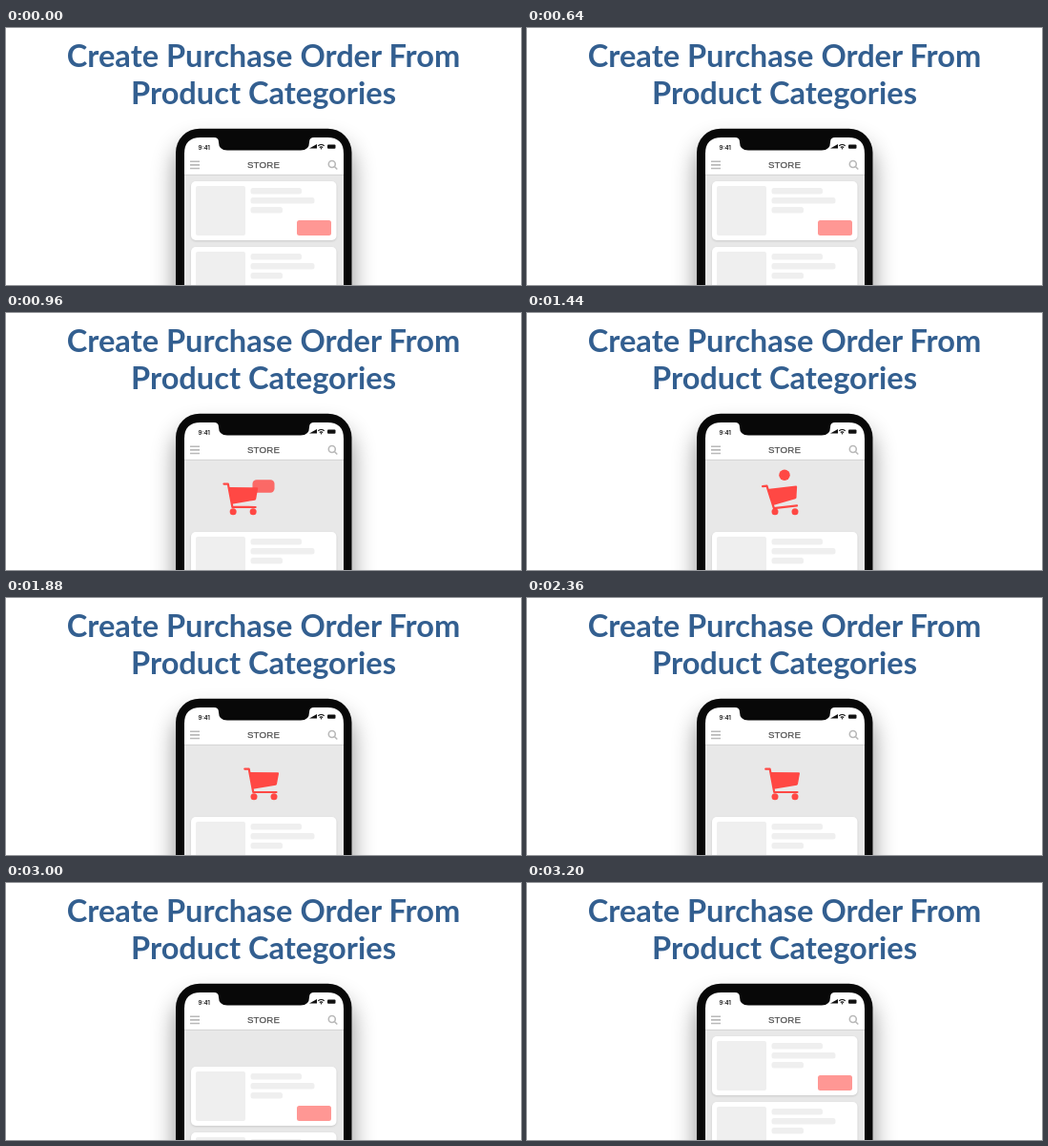
Write an HTML page that moves like this. It is 540 px wide and 270 px high and loops after 3.4 s.

```html
<!DOCTYPE html>
<html lang="en">
<head>
<meta charset="utf-8">
<style>
html, body { margin: 0; width: 100%; height: 100%; overflow: hidden; background: #fff; }
svg { display: block; width: 540px; height: 270px; }
.title { font: 700 32.6px Lato, sans-serif; fill: #335f90; text-anchor: middle; }
.store { font: 9.7px "Liberation Sans", Arial, sans-serif; letter-spacing: .2px; fill: #505050; stroke: #505050; stroke-width: .25; text-anchor: middle; }
.clock { font: 600 6.2px Inter, sans-serif; fill: #111; }
.phone { filter: drop-shadow(0 16px 12px rgba(0, 0, 0, .45)); }
.paper { filter: drop-shadow(0 1px 1px rgba(0, 0, 0, .13)); }
.icon { fill: none; stroke: #b9b9b9; stroke-width: 1.6; }
.red { fill: #ff4844; }
.bar { fill: none; stroke: #ff4844; stroke-width: 2.2; stroke-linecap: round; stroke-linejoin: round; }
</style>
</head>
<body>
<svg viewBox="0 0 540 270">
  <defs>
    <clipPath id="view"><rect x="187" y="155" width="167" height="115"/></clipPath>
    <rect id="paper" x="194" y="161" width="152.5" height="62" rx="5"/>
    <g id="parts" fill="#efefef">
      <rect x="199" y="166" width="52" height="52" rx="2"/>
      <rect x="256.5" y="168" width="53.5" height="6.5" rx="2.5"/>
      <rect x="256.5" y="178" width="67" height="6.5" rx="2.5"/>
      <rect x="256.5" y="188" width="33.5" height="6.5" rx="2.5"/>
    </g>
    <g id="card">
      <use href="#paper" class="paper" fill="#fff"/>
      <use href="#parts"/>
      <rect class="red" x="305" y="202" width="36" height="16" rx="2.5" opacity=".57"/>
    </g>
  </defs>

  <text class="title" x="270" y="41">Create Purchase Order From</text>
  <text class="title" x="270" y="80">Product Categories</text>

  <rect class="phone" x="178" y="105.7" width="184.5" height="260" rx="25" fill="#080808"/>
  <path d="M187 270V132q0-17 17-17h14q5 0 5 5q0 8.500 9 8.500h77q9 0 9-8.500q0-5 5-5h14q17 0 17 17v138z" fill="#fff"/>
  <text class="clock" x="201.5" y="128">9:41</text>
  <path d="M318 126.500h8l0-4.500z" fill="#111"/>
  <path d="M327.300 123.800q3.200-2.600 6.400 0M328.800 125.500q1.700-1.300 3.400 0" fill="none" stroke="#111" stroke-width="1.2"/>
  <circle cx="330.5" cy="126.700" r=".7" fill="#111"/>
  <rect x="337" y="122.500" width="8.500" height="4.200" rx="1" fill="#111"/>
  <path class="icon" d="M193 140.300h10M193 143.900h10M193 147.500h10"/>
  <text class="store" x="270" y="147.400">STORE</text>
  <circle class="icon" cx="341.800" cy="143" r="3.500"/>
  <path class="icon" d="M344.300 145.500l3 3"/>
  <path d="M187 154h167v116h-167z" fill="#e8e8e8"/>
  <path d="M187 154.300h167" stroke="#d4d4d4"/>

  <g clip-path="url(#view)">
    <g id="first">
      <g id="sheet"><use href="#paper" class="paper" fill="#fff"/></g>
      <g id="content"><use href="#parts"/></g>
      <use id="wash" href="#paper" class="red"/>
    </g>
    <circle id="ripple" class="red" cx="323" cy="210"/>
    <g id="cart">
      <g id="basket">
        <path class="bar" d="M250.300 179.600h4.400l4.500 24.200l24.300.200"/>
        <path class="red" d="M255.500 183l29.500.200q1.200.1 1 1.300l-2 11q-.2 1-1.200 1.200l-24 4z"/>
      </g>
      <circle class="red" cx="260" cy="208.800" r="3.500"/>
      <circle class="red" cx="281" cy="208.800" r="3.500"/>
    </g>
    <rect id="button" class="red"/>
    <g id="list">
      <use href="#card" y="69"/>
      <use href="#card" y="138"/>
    </g>
  </g>
</svg>
<script>
const LOOP = 3400, STEP = 40;
const $ = id => document.getElementById(id);
const set = (id, attrs) => {
  for (const name in attrs) $(id).setAttribute(name, attrs[name]);
};
const mix = (a, b, p) => a + (b - a) * p;

// Progress from 0 to 1 over a span of time, straight or eased
const span = (t, start, length) => Math.min(1, Math.max(0, (t - start) / length));
const ease = (t, start, length) => (1 - Math.cos(Math.PI * span(t, start, length))) / 2;

// Swing that dies away after one and a half turns
function wobble(t, start, length, size) {
  const p = span(t, start, length);
  return size * Math.sin(3 * Math.PI * p) * (1 - p);
}

const scaleAt = (s, x, y) => `translate(${x} ${y}) scale(${s}) translate(${-x} ${-y})`;

function tapCard(t) {
  const press = span(t, 640, 160), fade = span(t, 800, 120);
  const shrunk = scaleAt(1 - .05 * press, 270, 163);
  set('first', { opacity: 1 - fade });
  set('sheet', { transform: shrunk });
  set('wash', { transform: shrunk, opacity: .07 * press });
  set('content', { transform: scaleAt(1 - .09 * press, 264, 178) });
  set('ripple', { r: 25 * ease(t, 640, 160) + 4 * fade, opacity: .13 * (1 - fade) });
}

// The button flies to the middle, rounds into a ball, rises and drops into the cart
function moveButton(t) {
  const fly = ease(t, 760, 200), round = span(t, 640, 440) ** 2;
  const w = mix(36, 11.5, round), h = mix(16, 11.5, round);
  const x = mix(323, 270, fly);
  const y = mix(210, 182, fly) - 20 * ease(t, 1140, 540) + 29 * ease(t, 1740, 140);
  set('button', {
    x: x - w / 2, y: y - h / 2, width: w, height: h,
    rx: mix(2.5, 5.75, round),
    opacity: t < 1880 ? mix(.57, 1, round) : 0
  });
}

function moveCart(t) {
  const enter = -110 * (1 - ease(t, 720, 340));
  const leave = 33 * Math.max(0, (t - 2320) / 440) ** 4.5;
  const tilt = wobble(t, 1080, 720, 14) + wobble(t, 1880, 400, 1.5) - 4 * ease(t, 2320, 400);
  set('cart', { transform: `translate(${enter + leave} 0)` });
  set('basket', { transform: `rotate(${tilt} 270 207)` });
}

function frame(now) {
  const t = Math.floor(now % LOOP / STEP) * STEP;
  tapCard(t);
  moveButton(t);
  moveCart(t);
  set('list', { transform: `translate(0 ${-69 * ease(t, 2780, 420)})` });
  requestAnimationFrame(frame);
}
frame(0);
</script>
</body>
</html>
```
